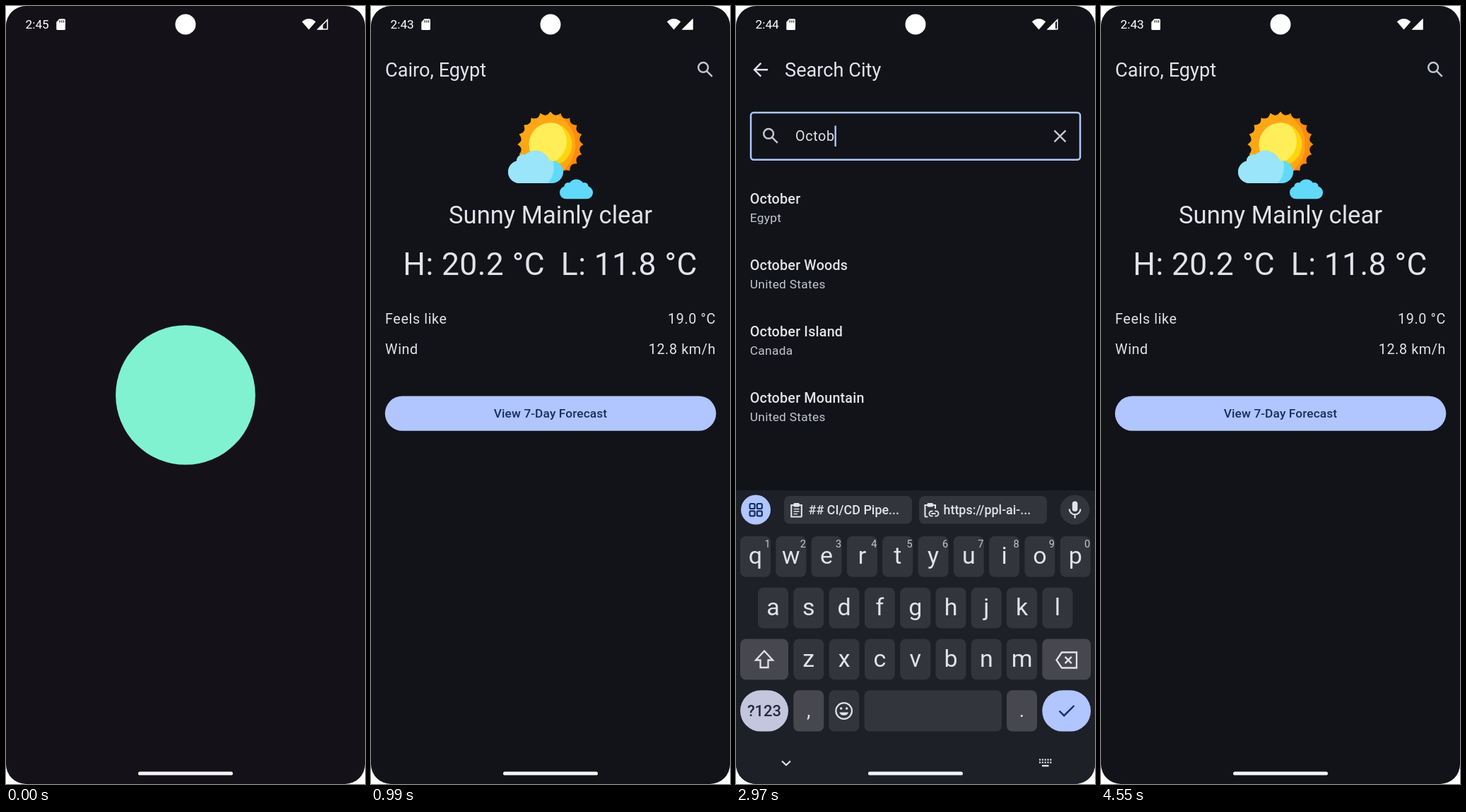
Write an HTML page that moves like this. It is 508 by 1102 pixels and loops after 4950 ms.

```html
<!DOCTYPE html>
<html lang="en">
<head>
<meta charset="utf-8">
<title>Weather app tour</title>
<style>
  html, body { margin: 0; width: 100%; height: 100%; overflow: hidden; background: #fff; }
  svg { display: block; }
  text { font-family: Roboto, sans-serif; fill: #e2e2e9; white-space: pre; }
  .line { fill: none; stroke: #e2e2e9; stroke-width: 2.4; }
  .navy { stroke: #152e60; }
  .soft { stroke: #c4c6d0; }
</style>
</head>
<body>
<svg id="stage" width="508" height="1102" viewBox="0 0 508 1102"></svg>
<script>
const SCENE_MS = 990;
const INK = '#e2e2e9', MUTED = '#c4c6d0', PRIMARY = '#b1c5ff', NAVY = '#152e60';
const KEY = '#33353d', KEY_ALT = '#47474f', CARD = '#33353d';

// Type styles: [size, letter spacing, weight]
const TITLE = [27.2, 0, 400], HEADLINE = [34.57, 0, 400], DISPLAY = [44.45, 0.4, 400];
const BODY = [19.76, 0.617, 400], STRONG = [19.76, 0.185, 500], SMALL = [17.29, 0.31, 400];
const LABEL = [17.29, 0.12, 500], CHIP = [17.9, 0, 500], LETTER = [34, 0, 400], HINT = [14.5, 0, 400];

const text = (x, y, content, [size, spacing, weight], anchor = 'start', fill = INK) =>
  `<text x="${x}" y="${y}" font-size="${size}" letter-spacing="${spacing}" font-weight="${weight}"
    text-anchor="${anchor}" style="fill:${fill}">${content}</text>`;
const box = (x, y, w, h, r, fill) =>
  `<rect x="${x}" y="${y}" width="${w}" height="${h}" rx="${r}" fill="${fill}"/>`;
const disc = (x, y, r, fill) => `<circle cx="${x}" cy="${y}" r="${r}" fill="${fill}"/>`;
const shape = (d, fill) => `<path d="${d}" fill="${fill}"/>`;
const line = (d, tone = '', width = 2.4) =>
  `<path class="line ${tone}" style="stroke-width:${width}" d="${d}"/>`;
const screen = fill => box(0, 0, 508, 1102, 28, fill);

const searchIcon = (x, y) =>
  line(`M${x + 4} ${y - 3.1}a6.9 6.9 0 1 1 -13.8 0a6.9 6.9 0 1 1 13.8 0M${x + 1.8} ${y + 1.8}l8 8`, 'soft', 2.5);
const cross = (x, y, r, tone) =>
  line(`M${x - r} ${y - r}l${2 * r} ${2 * r}m0 ${-2 * r}l${-2 * r} ${2 * r}`, tone);
const topBar = title =>
  line('M45 90.3H26.5M35.3 80.9L26 90.3L35.3 99.7') + text(69, 99.5, title, TITLE);

function systemBars(time, signal) {
  const x = 440 + 15.5 * signal, y = 33.5 - 15.5 * signal;
  return text(27.5, 32, time, [17.29, 0, 400], 'start', '#fff')
    + shape('M75.5 18.3H82.5Q84 18.3 84 20V32.5Q84 34 82.5 34H73Q71.3 34 71.3 32.5V22.7Z', '#fff')
    + line('M76.2 20.3v3.2m2.8 -3.2v3.2m2.7 -3.2v3.2', '" stroke-opacity="1', 1.2).replace('stroke-width', 'stroke:#222;stroke-width')
    + disc(254, 26, 14.5, '#fff')
    + shape('M418.8 22.2Q428.5 13.6 438.3 22.2L428.5 33.5Z', '#fff')
    + `<path d="M441.5 32.7H454.8V19.5Z" fill="none" stroke="#fff" stroke-width="1.5"/>`
    + shape(`M440 33.5H${x}V${y}Z`, '#fff')
    + box(187, 1084.4, 134, 5.2, 2.6, '#f4f4f4');
}

const splash = () => screen('#141218') + disc(254, 551, 98.8, '#80f2d0') + systemBars('2:45', 0.55);

function sunRim(cx, cy, spikes) {
  const at = (r, turn) => {
    const a = turn / spikes * 2 * Math.PI - Math.PI / 2;
    return `${(cx + r * Math.cos(a)).toFixed(2)} ${(cy + r * Math.sin(a)).toFixed(2)}`;
  };
  let d = `M${at(46.5, 0)}`;
  for (let i = 0; i < spikes; i++) d += `Q${at(37.5, i + 0.5)} ${at(46.5, i + 1)}`;
  return d + 'Z';
}

function weatherIcon() {
  const rim = sunRim(254, 196, 20);
  const cloud = fill => `<g fill="${fill}">` + box(194, 219, 78, 32, 16, fill)
    + disc(215.5, 219.5, 9.5, fill) + disc(232.5, 226.5, 21.5, fill) + '</g>';
  return `<defs>
      <clipPath id="rimLight"><circle cx="241.5" cy="196" r="47.5"/></clipPath>
      <clipPath id="coreLight"><circle cx="246" cy="192" r="31"/></clipPath>
      <clipPath id="core"><circle cx="254" cy="196" r="30.5"/></clipPath>
      <clipPath id="cloudLight"><circle cx="224" cy="228" r="35"/></clipPath>
    </defs>`
    + shape(rim, '#ff8c0a') + `<g clip-path="url(#rimLight)">${shape(rim, '#ffa617')}</g>`
    + disc(254, 196, 30.5, '#ffd50d')
    + `<g clip-path="url(#core)">${disc(246, 192, 31, '#ffee58')}</g>`
    + cloud('#60d9fa') + `<g clip-path="url(#cloudLight)">${cloud('#9ae5f9')}</g>`
    + box(267, 255, 47, 18.3, 9.1, '#60d9fa') + disc(290.5, 257, 11.5, '#60d9fa')
    + disc(279, 255.5, 5.5, '#60d9fa') + disc(302, 255.5, 5.5, '#60d9fa');
}

function current() {
  return screen('#111318') + systemBars('2:43', 1)
    + text(20, 99.5, 'Cairo, Egypt', TITLE) + searchIcon(473, 90)
    + weatherIcon()
    + text(254, 307.5, 'Sunny Mainly clear', HEADLINE, 'middle')
    + text(45.3, 380.5, 'H: 20.2 °C  L: 11.8 °C', DISPLAY)
    + text(20, 450, 'Feels like', BODY) + text(488, 450, '19.0 °C', BODY, 'end')
    + text(20, 493, 'Wind', BODY) + text(488, 493, '12.8 km/h', BODY, 'end')
    + box(19.8, 552.5, 468.5, 49.3, 24.6, PRIMARY)
    + text(254, 583, 'View 7-Day Forecast', LABEL, 'middle', NAVY);
}

function forecast() {
  const days = [
    ['Sunday, Jan 5', '20.2', '11.8'], ['Monday, Jan 6', '22.5', '13.3'],
    ['Tuesday, Jan 7', '20.8', '10.6', 'Cloudy Fog'], ['Wednesday, Jan 8', '21.6', '9.3'],
    ['Thursday, Jan 9', '22.7', '8.3'], ['Friday, Jan 10', '20.4', '10.6'],
    ['Saturday, Jan 11', '19.4', '12.0']
  ];
  const card = ([day, high, low, sky = 'Sunny Mainly clear'], i) => {
    const y = 149.8 + 103.85 * i;
    return box(19.8, y, 468.5, 93.9, 14.8, CARD)
      + text(39.5, y + 41.5, day, STRONG) + text(39.5, y + 67.5, sky, SMALL)
      + text(468.5, y + 41.5, high + ' °C', STRONG, 'end')
      + text(468.5, y + 67.5, low + ' °C', SMALL, 'end', '#b5b7bf');
  };
  return screen('#111318') + systemBars('2:44', 1) + topBar('7 Day Forecast') + days.map(card).join('');
}

function keyRow(letters, x0, y, hints = '') {
  return [...letters].map((letter, i) => {
    const x = x0 + 50.3 * i;
    return box(x, y, 43, 57.8, 8, KEY) + text(x + 21.5, y + 39.3, letter, LETTER, 'middle')
      + (hints ? text(x + 38.5, y + 16, hints[i], HINT, 'middle', MUTED) : '');
  }).join('');
}

function toolStrip() {
  const tile = (x, y) =>
    `<rect class="line navy" x="${x}" y="${y}" width="7" height="7" rx="1.5" style="stroke-width:2.2"/>`;
  const clipboard = (x, rest) =>
    line(`M${x + 5} 707H${x + 1}V723.5${rest}M${x + 11} 707h4.5v`
      + (rest ? '16.5' : '5'), '', 2.1) + box(x + 4, 704, 8.5, 5.5, 1.5, INK);
  return disc(28, 713.5, 21, PRIMARY) + tile(19.5, 705) + tile(29.8, 705) + tile(19.5, 715.3) + tile(29.8, 715.3)
    + box(68, 694, 181, 39.5, 8, KEY) + clipboard(77.3, 'h14.5')
    + line('M81.5 712.5h8m-8 3.5h8m-8 3.5h5.5', '', 1.7)
    + text(102.5, 720, '## CI/CD Pipe...', CHIP)
    + box(259, 694, 181, 39.5, 8, KEY) + clipboard(266.5, '')
    + line('M267.5 723.5h4M278.5 715.5h-1.5a3.5 3.5 0 0 0 0 7h1.5m3 -7h1.5a3.5 3.5 0 0 1 0 7h-1.5m-5 -3.5h6', '', 1.9)
    + text(293.5, 720, 'https:\/\/ppl-ai-...', CHIP)
    + disc(479.5, 713.5, 21, KEY) + box(475.8, 701.5, 7.6, 14.5, 3.8, INK)
    + line('M471.8 712.5a7.8 7.8 0 0 0 15.6 0M479.6 720.5v5', '', 2.2);
}

function keyboard() {
  const dots = [0, 1, 2, 3, 4].map(i =>
    box(429 + 3.8 * i, 1066.5, 2.2, 2.2, 0, INK) + box(429 + 3.8 * i, 1070.4, 2.2, 2.2, 0, INK)).join('');
  return shape('M0 686H508V1074A28 28 0 0 1 480 1102H28A28 28 0 0 1 0 1074Z', '#1e2028')
    + toolStrip()
    + keyRow('qwertyuiop', 6, 751, '1234567890')
    + keyRow('asdfghjkl', 31, 823.8)
    + keyRow('zxcvbnm', 81.3, 896.5)
    + box(6, 896.5, 68, 57.8, 8, KEY_ALT) + line('M40 913.5L28 926.5H34.5V937H45.5V926.5H52Z', '', 2.3)
    + box(433.3, 896.5, 68.7, 57.8, 8, KEY_ALT) + line('M453.5 926.5L461 915.5H482V937.5H461Z', '', 2.3)
    + cross(470.2, 926.5, 4.6)
    + box(6, 969.3, 68, 58.3, 29, '#c3c6dd') + text(40, 1006, '?123', [22, 0, 500], 'middle', '#242a40')
    + box(81.3, 969.3, 43, 58.3, 8, KEY_ALT) + text(102.8, 1007, ',', [28, 0, 400], 'middle')
    + box(131.3, 969.3, 43, 58.3, 8, KEY)
    + line('M164 998.5a11.3 11.3 0 1 1 -22.6 0a11.3 11.3 0 1 1 22.6 0', '', 2.2)
    + disc(148.7, 995, 1.8, INK) + disc(156.7, 995, 1.8, INK)
    + shape('M146.2 1000.5H159.2A6.8 6 0 0 1 146.2 1000.5Z', INK)
    + box(181.6, 969.3, 194.4, 58.3, 8, KEY)
    + box(383, 969.3, 43, 58.3, 8, KEY_ALT) + text(404.5, 1007, '.', [28, 0, 400], 'middle')
    + box(433.3, 969.3, 68.7, 58.3, 29, PRIMARY) + line('M457.5 998.5L464.2 1005.2L478.5 991', 'navy', 2.4)
    + line('M65 1069.5L71 1075.3L77 1069.5', '', 2.2)
    + dots + box(433, 1075, 9.5, 2.4, 0, INK);
}

function search() {
  const cities = [['October', 'Egypt'], ['October Woods', 'United States'],
    ['October Island', 'Canada'], ['October Mountain', 'United States']];
  return screen('#111318') + topBar('Search City')
    + `<rect x="21" y="151" width="466" height="66.8" rx="4" fill="none" stroke="${PRIMARY}" stroke-width="2.5"/>`
    + searchIcon(49, 184) + text(84, 191, 'Octob', BODY)
    + box(139.5, 169.5, 2.4, 29.5, 0, PRIMARY) + cross(458.5, 184.3, 8, 'soft')
    + cities.map(([city, country], i) =>
        text(19.8, 280 + 93.9 * i, city, STRONG)
        + text(19.8, 306.3 + 93.9 * i, country, SMALL, 'start', MUTED)).join('')
    + keyboard() + systemBars('2:44', 0.78);
}

const scenes = [splash(), current(), forecast(), search()];
const order = [0, 1, 2, 3, 1];
const stage = document.getElementById('stage');
stage.innerHTML = scenes.map(content => `<g display="none">${content}</g>`).join('');
const groups = [...stage.children];

function draw(now) {
  const active = order[Math.floor((now - start) / SCENE_MS) % order.length];
  groups.forEach((group, i) => group.setAttribute('display', i === active ? 'inline' : 'none'));
}
function tick() {
  draw(performance.now());
  requestAnimationFrame(tick);
}
const start = performance.now();
tick();
</script>
</body>
</html>
```
